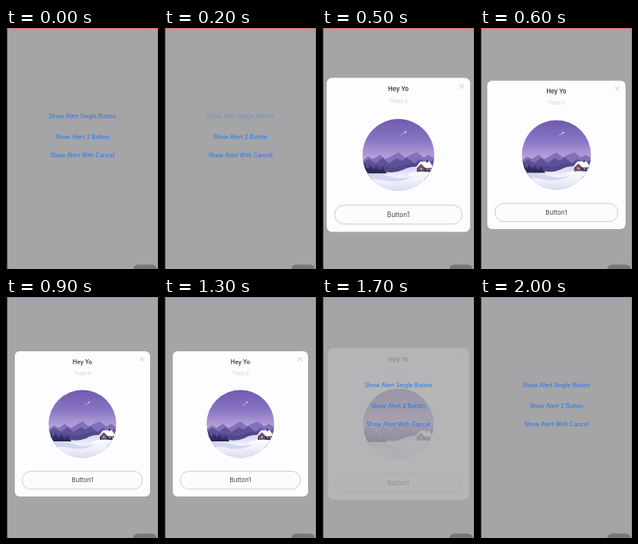
These frames come from a looping animation (191 by 302 pixels, 2100 ms). An HTML page:

```html
<!DOCTYPE html>
<html lang="en">
<head>
<meta charset="utf-8">
<title>Alert demo</title>
<style>
html, body { margin: 0; width: 100%; height: 100%; overflow: hidden; background: #a5a4a6; }
svg { display: block; width: 191px; height: 302px; }
text { font-family: Inter, Roboto, sans-serif; text-anchor: middle; }
#links { font-size: 7.25px; fill: #1b78f2; }
</style>
</head>
<body>
<svg viewBox="0 0 191 302">
  <defs>
    <linearGradient id="sky" x1="0" y1="0" x2="0" y2="1">
      <stop offset="0" stop-color="#6d5bb0"/>
      <stop offset=".3" stop-color="#8975c3"/>
      <stop offset=".55" stop-color="#b9a4dc"/>
    </linearGradient>
    <linearGradient id="snow" x1="0" y1="0" x2="0" y2="1">
      <stop offset="0" stop-color="#cfd3f0"/>
      <stop offset=".45" stop-color="#f5f5fd"/>
      <stop offset="1" stop-color="#d9daf0"/>
    </linearGradient>
    <clipPath id="disc"><circle cx="96" cy="159" r="42.5"/></clipPath>
  </defs>

  <rect width="191" height="302" fill="#a5a4a6"/>
  <rect x="160" y="296.5" width="29.5" height="14" rx="6" fill="#77767a"/>

  <g id="card">
    <rect x="11" y="68" width="170" height="182" rx="6" fill="#fdfcfe"/>
    <path d="M168 75l6 6m0-6l-6 6" stroke="#c3c2c7" stroke-width=".8"/>
    <text x="96" y="84" font-size="7.2" font-weight="600" fill="#3a393d">Hey Yo</text>
    <text x="96" y="97.6" font-size="6.1" fill="#d0cfd4">Thats it</text>
    <g clip-path="url(#disc)">
      <rect x="53" y="116" width="86" height="86" fill="url(#sky)"/>
      <path d="M98.7 136l5.8-4.2" stroke="#d9cff2" stroke-width=".6"/>
      <path d="M103 132.9l2.6-1.9" stroke="#fff" stroke-width="1"/>
      <path fill="#8270b8" d="M53 166l7-5 6 3 8-5 7 5 6-3 9-5 8 6 6-3 8-3 8 6 6-3 7 4v25H53z"/>
      <path fill="#5d5299" d="M53 169l8-5 8 5 8-6 8 6 9-6 6 3 6-4 9 7 7-5 7 5 10-4v23H53z"/>
      <path fill="#51468a" d="M53 175l20-3 18 2 20-5 28 4v16H53z"/>
      <path fill="url(#snow)" d="M53 179q14-3 28 0 10 2 20-2 8-5 20-4 10 0 18 3v27H53z"/>
      <path fill="#bfc5ea" d="M53 183q20-3 34 2 15 4 28-2-13 9-31 7-15-4-31-1z" opacity=".6"/>
      <path id="trees" fill="#2c2959"/>
      <g id="house">
        <path fill="#39315f" d="M118 172h18v7.5h-18z"/>
        <path fill="#69506f" d="M119 179.5v-6l4-4 4 4v6z"/>
        <path fill="#fff" d="M116 174.5l6-7.5h11l5 7.5h-10l-5-5-5 5z"/>
        <path fill="#4a3c62" d="M129 165h2v3h-2z"/>
        <path fill="#f1bd78" d="M122 174.5h2v2h-2zM129.500 175.500h1.700v1.600h-1.700zM133 175.500h1.500v1.600h-1.500z"/>
      </g>
      <path fill="#f8f8ff" d="M108 181q12-4 31-1v5q-18-2-31 0z"/>
    </g>
    <rect x="20.400" y="218.400" width="151.200" height="22.400" rx="11.200" fill="#fcfbfd" stroke="#c9c8cd" stroke-width=".9"/>
    <text x="96" y="232.400" font-size="7.8" fill="#48474b">Button1</text>
  </g>

  <g id="links">
    <text id="single" x="96" y="112.900">Show Alert Single Button</text>
    <text x="96" y="139.100">Show Alert 2 Button</text>
    <text x="96" y="162.200">Show Alert With Cancel</text>
  </g>
  <path d="M0 0h1.500v302H0z" fill="#060606"/>
  <path d="M1.500 0H191v1H1.500z" fill="#ed6c61"/>
  <path d="M190.300 1h.7v301h-.7z" fill="#888789"/>
</svg>
<script>
const LOOP = 2100, STEP = 100;
const el = id => document.getElementById(id);

// Each row holds from its time on: ms, card scale, card opacity, links opacity, first link opacity.
const steps = [
  [0, 1.11, 0, 1, 1],
  [100, 1.11, 0, 1, .6],
  [200, 1.11, 0, 1, .4],
  [300, 1.11, 1, 0, 1],
  [400, 1.085, 1, 0, 1],
  [500, 1.06, 1, 0, 1],
  [600, 1.022, 1, 0, 1],
  [700, 1.01, 1, 0, 1],
  [800, 1.003, 1, 0, 1],
  [900, 1, 1, 0, 1],
  [1600, 1.003, .88, 0, 1],
  [1700, 1.043, .18, 1, 1],
  [1800, 1.06, 0, 1, 1]
];

// A row of small firs, taller towards the left.
el('trees').setAttribute('d', Array.from({ length: 11 }, (_, i) => {
  const x = 54 + i * 2.6, h = 12 - i * .6 + 2.5 * Math.sin(i * 2.3);
  return `M${x} ${181 - h}l2.300 ${h}h-4.600z`;
}).join(''));

function draw() {
  const t = Math.floor(performance.now() % LOOP / STEP) * STEP;
  const [, scale, alpha, links, single] = steps.filter(s => s[0] <= t).pop();
  el('card').setAttribute('transform', `translate(96 159) scale(${scale}) translate(-96 -159)`);
  el('card').setAttribute('opacity', alpha);
  el('links').setAttribute('opacity', links);
  el('single').setAttribute('opacity', single);
  requestAnimationFrame(draw);
}
draw();
</script>
</body>
</html>
```
